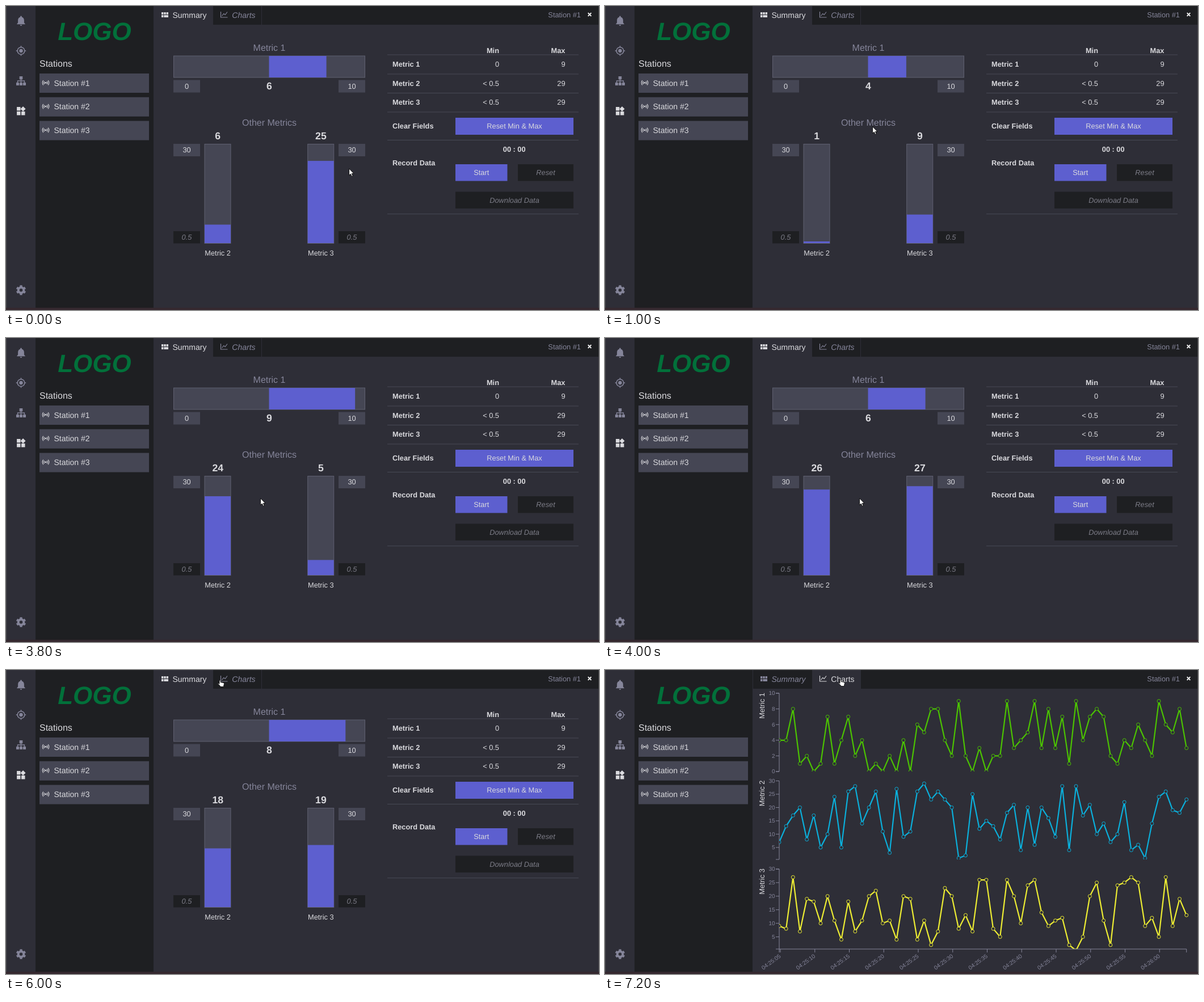
Animation of 1045 by 536 pixels, one loop 8000 ms. Source, as an HTML page:

```html
<!DOCTYPE html>
<html lang="en">
<head>
<meta charset="utf-8">
<title>Station dashboard</title>
<style>
  html, body { margin: 0; width: 100%; height: 100%; overflow: hidden; background: #2e2e37; }
  svg { display: block; width: 1045px; height: 536px; }
  text { font: 12.8px "Liberation Sans", Arial, sans-serif; fill: #dadade; text-rendering: geometricPrecision; }
  .bold { font-weight: bold; }
  .dim { fill: #85859a; }
  .off { fill: #7c7c87; font-style: italic; }
  .tick { font-size: 10px; fill: #85859a; }
</style>
</head>
<body>
<svg id="stage" viewBox="0 0 1045 536"></svg>
<script>
const BG = '#2e2e37', DARK = '#1e1f22', PANEL = '#454654', EDGE = '#5f6071',
      ACCENT = '#5d5fcf', LIGHT = '#dadade', MUTED = '#85859a', RULE = '#484955';

const series = [
  { name: 'Metric 1', color: '#4bc400', top: 41, bottom: 179, min: 0, max: 10, step: 2, data: [
    4, 4, 8, 1, 2, 0, 1, 7, 1, 4, 7, 2, 4, 0, 1, 0, 2, 0, 4, 0,
    6, 5, 8, 8, 4, 2, 9, 2, 0, 3, 0, 2, 2, 9, 3, 4, 5, 9, 3, 8,
    3, 7, 1, 9, 4, 7, 8, 7, 2, 1, 4, 3, 6, 4, 2, 9, 6, 5, 8, 3] },
  { name: 'Metric 2', color: '#0ab0dc', top: 195.5, bottom: 334, min: .5, max: 30, step: 5, data: [
    7, 13, 17, 20, 8, 17, 5, 10, 24, 5, 26, 28, 14, 20, 26, 11, 3, 27, 9, 11,
    26, 29, 23, 26, 23, 20, 1, 2, 25, 12, 15, 13, 8, 18, 21, 4, 20, 6, 20, 16,
    9, 28, 4, 28, 17, 21, 10, 14, 7, 10, 22, 4, 6, 1, 14, 24, 26, 19, 18, 23] },
  { name: 'Metric 3', color: '#eded33', top: 351, bottom: 492, min: .5, max: 30, step: 5, data: [
    9, 8, 27, 7, 19, 18, 10, 20, 11, 4, 18, 7, 11, 20, 22, 10, 11, 4, 20, 19,
    4, 11, 2, 7, 23, 20, 8, 13, 7, 26, 26, 8, 5, 26, 20, 10, 24, 26, 14, 9,
    11, 12, 2, 0, 5, 20, 25, 11, 2, 24, 25, 27, 25, 9, 12, 5, 27, 9, 19, 13] }
];

const rect = (x, y, w, h, fill, extra = '') =>
  `<rect x="${x}" y="${y}" width="${w}" height="${h}" fill="${fill}" ${extra}/>`;
const text = (x, y, s, cls = '', anchor = 'start', extra = '') =>
  `<text x="${x}" y="${y}" class="${cls}" text-anchor="${anchor}" ${extra}>${s}</text>`;
const path = (d, stroke, width = 1, extra = '') =>
  `<path d="${d}" fill="none" stroke="${stroke}" stroke-width="${width}" ${extra}/>`;
const size = px => `style="font-size:${px}px"`;
const button = (x, y, w, h, s, on) =>
  rect(x, y, w, h, on || DARK) + text(x + w / 2, y + h / 2 + 4.4, s, on ? '' : 'off', 'middle');
const gauge = (x, y, w, h) =>
  rect(x + .5, y + .5, w - 1, h - 1, PANEL, `stroke="${EDGE}"`);

function sideBar() {
  const station = (n) => {
    const y = 119 + 41.8 * n, cy = y + 16.3;
    const waves = [-1, 1].map(s =>
      path(`M${70 + s * 2.3} ${cy - 2.5}q${s * 2} 2.5 0 5M${70 + s * 4.2} ${cy - 4.2}q${s * 3.2} 4.2 0 8.4`, LIGHT, 1.1)).join('');
    return rect(59, y, 193, 34, PANEL) + waves + `<circle cx="70" cy="${cy}" r="1.4" fill="${LIGHT}"/>` +
      text(84.5, y + 21.5, `Station #${n + 1}`, '', 'start', size(14));
  };
  const node = (x, y) => rect(x, y, 5, 5, MUTED);
  return rect(52, 0, 208, 532, DARK) +
    text(156, 60, 'LOGO', '', 'middle', 'style="font-size:44px;font-weight:bold;font-style:italic;fill:#02703a"') +
    text(59, 107, 'Stations', '', 'start', size(16)) +
    [0, 1, 2].map(station).join('') +
    `<path transform="translate(15.7 15.2) scale(.9)" fill="${MUTED}" d="M12 22q2 0 2-2h-4q0 2 2 2zM18 16v-5c0-3-1.6-5.600-4.500-6.300V4a1.500 1.500 0 0 0-3 0v.7C7.600 5.400 6 8 6 11v5l-2 2v1h16v-1z"/>` +
    `<circle cx="26.500" cy="79" r="3.200" fill="${MUTED}"/><circle cx="26.500" cy="79" r="6.300" fill="none" stroke="${MUTED}" stroke-width="1.600"/>` +
    path('M26.500 70.300v2.500M26.500 85.200v2.500M17.800 79h2.500M32.700 79h2.500', MUTED, 1.6) +
    rect(23.7, 124, 5.6, 5.5, MUTED) + node(18, 135) + node(24, 135) + node(30, 135) +
    path('M26.500 129v6M20.500 135v-3h12v3', MUTED, 1.4) +
    `<path transform="translate(16.700 175.600) scale(.8)" fill="${LIGHT}" d="M13 13h8v8h-8zM3 13h8v8H3zM3 3h8v8H3zM16.700 1.700L11 7.300l5.700 5.700 5.600-5.700z"/>` +
    `<circle cx="26.500" cy="501" r="4.800" fill="none" stroke="${MUTED}" stroke-width="4"/>` +
    `<circle cx="26.500" cy="501" r="7.300" fill="none" stroke="${MUTED}" stroke-width="2.800" pathLength="12" stroke-dasharray="1.100 .9" stroke-dashoffset=".55" transform="rotate(30 26.500 501)"/>`;
}

function tabs(chartsOpen) {
  const colors = chartsOpen ? [MUTED, LIGHT] : [LIGHT, MUTED];
  const label = (x, s, i) => text(x, 21, s, '', 'start',
    `style="font-size:14px;fill:${colors[i]};font-style:${colors[i] === MUTED ? 'italic' : 'normal'}"`);
  const tile = (x, y, w) => rect(x, y, w, 4, colors[0]);
  return rect(260, 0, 784, 33, DARK) +
    rect(chartsOpen ? 365 : 260, 0, chartsOpen ? 86 : 105, 33.500, BG) +
    rect(260, 0, 1, 33, BG) + rect(450, 0, 1, 33, BG) +
    tile(274, 11, 3.4) + tile(278.3, 11, 3.4) + tile(282.6, 11, 3.4) + tile(274, 16, 3.4) + tile(278.3, 16, 7.7) +
    path('M378.500 10v10h12', colors[1], 1.2) + path('M380.500 17.500l3.200-4 2.500 2 3.800-5', colors[1], 1.2) +
    label(293.5, 'Summary', 0) + label(398.3, 'Charts', 1) +
    text(1013, 19.5, 'Station #1', 'dim', 'end') +
    path('M1025.700 12.200l5.600 5.600M1031.300 12.200l-5.600 5.600', '#fff', 1.9);
}

function summary() {
  const rows = [['Metric 1', '0', 9], ['Metric 2', '&lt; 0.5', 29], ['Metric 3', '&lt; 0.5', 29]];
  const value = (x, y) => text(x, y, '', 'bold value', 'middle', size(17.6));
  return text(464, 78.5, 'Metric 1', 'dim', 'middle', size(16)) +
    gauge(295, 87.5, 338, 39) + rect(463.5, 88, 0, 38, ACCENT, 'class="fill"') +
    button(295, 130.5, 47, 22, '0', PANEL) + button(586, 130.5, 47, 22, '10', PANEL) + value(464, 146.5) +
    text(464, 210.5, 'Other Metrics', 'dim', 'middle', size(16)) +
    [[349.5, 295, 2], [531.2, 586, 3]].map(([x, side, n]) =>
      gauge(x, 243, 47, 176) + rect(x + .5, 418, 46, 0, ACCENT, 'class="fill"') +
      button(side, 243, 47, 22, '30', PANEL) + button(side, 397, 47, 21.5, '0.5') +
      value(x + 23.7, 234.8) + text(x + 23.6, 440, 'Metric ' + n, '', 'middle')).join('') +
    text(869, 82.5, 'Min', 'bold', 'end') + text(985.5, 82.5, 'Max', 'bold', 'end') +
    rows.map(([name, lo, hi], i) => {
      const y = 107 + 33.7 * i;
      return text(681, y, name, 'bold') + text(869, y, lo, '', 'end') + text(985.5, y, hi, '', 'end');
    }).join('') +
    path([86, 120, 153.5, 187, 236.5, 366.7].map(y => `M672 ${y}H1009`).join(''), RULE) +
    text(681, 215.5, 'Clear Fields', 'bold') + text(681, 281.3, 'Record Data', 'bold') +
    text(895.7, 257, '00 : 00', 'bold', 'middle') +
    button(792, 197, 208, 30, 'Reset Min &amp; Max', ACCENT) +
    button(792, 279, 91.5, 29.5, 'Start', ACCENT) + button(902, 279, 98, 29.5, 'Reset') +
    button(792, 327.5, 208, 29.5, 'Download Data');
}

function charts() {
  const left = 307, right = 1024.7, stepX = (right - left) / 59;
  const chart = ({ name, color, top, bottom, min, max, step, data }, k) => {
    const yOf = v => bottom - (v - min) / (max - min) * (bottom - top);
    const points = data.map((v, i) => [left + i * stepX, yOf(v)]);
    let ticks = '', marks = `M301 ${top}H${left}V${bottom}H301`;
    for (let v = Math.ceil(min / step) * step; v <= max; v += step) {
      marks += `M301 ${yOf(v)}H${left}`;
      ticks += text(299.5, yOf(v) + 3.3, v, 'tick', 'end');
    }
    return path(marks, MUTED) + ticks +
      text(0, 0, name, '', 'middle', `transform="translate(280.500 ${top + 22}) rotate(-90)"`) +
      `<clipPath id="clip${k}">${rect(left, top - 4, 724, bottom - top + 4, '#000')}</clipPath><g clip-path="url(#clip${k})">` +
      path('M' + points.join('L'), color, 2.2, 'stroke-linejoin="round"') +
      points.map(([x, y]) => `<circle cx="${x}" cy="${y}" r="3" fill="${BG}" stroke="${color}"/>`).join('') + '</g>';
  };
  let times = '', marks = `M${left} 498V492H${right}V498`;
  for (let i = 0; i < 12; i++) {
    const x = 309 + 60.75 * i, s = 5 + 5 * i;
    const stamp = `04:${25 + Math.floor(s / 60)}:${String(s % 60).padStart(2, '0')}`;
    marks += `M${x} 492v6`;
    times += text(0, 0, stamp, 'tick', 'end', `transform="translate(${x + 1.5} 506) rotate(-36)"`);
  }
  return series.map(chart).join('') + path(marks, MUTED) + times;
}

const stage = document.getElementById('stage');
stage.innerHTML = rect(0, 0, 1045, 536, BG) + sideBar() +
  `<g id="summary">${tabs(false)}${summary()}</g><g id="charts">${tabs(true)}${charts()}</g>` +
  rect(0, 0, 1.3, 536, '#434247') + rect(1044, 0, 1, 536, '#434247') + rect(0, 532, 1045, 4, '#35282f') +
  `<g id="pointer"><path id="arrow" fill="#fff" stroke="#000" stroke-width=".9" d="M.6.8V12.500L3.300 10.100 5.200 14.400 7.200 13.500 5.300 9.400H9z"/>
   <path id="hand" fill="#fff" stroke="#000" stroke-width=".8" d="M3 7.500V1.700Q4-.1 5.200 1.700V4.600L10 5.400Q11.700 5.800 11.500 7.500L10.600 10.500V12.500H4.600V11.300L.6 7.400Q.9 5.700 3 7.500z"/></g>`;

const find = id => document.getElementById(id);
const fills = stage.querySelectorAll('.fill'), values = stage.querySelectorAll('.value');
const updates = [0, 1000, 2000, 3800, 4000, 5100, 6000, 7000];
const stops = [
  [1000, 471, 212], [2500, 468, 212], [3800, 448, 282], [5100, 377, 138], [5400, 340, 48],
  [5600, 336, 31], [5800, 343, 23], [6000, 373, 17], [6400, 411, 16]
];

function pointerAt(t) {
  if (t >= 1000) return stops.filter(s => s[0] <= t).pop().slice(1);
  const k = t < 300 ? 0 : (Math.floor((t - 300) / 100) + 1) / 8;
  return [604 - 133 * k, 286 - 74 * k];
}

function draw(now) {
  const t = now % 8000, onCharts = t >= 7200;
  find('summary').style.display = onCharts ? 'none' : '';
  find('charts').style.display = onCharts ? '' : 'none';

  const index = 52 + updates.filter(u => u <= t).length - 1;
  series.forEach(({ data }, i) => {
    const v = data[index];
    values[i].textContent = v;
    if (i === 0) fills[i].setAttribute('width', 16.85 * v);
    else {
      const h = 174.5 * (v - .5) / 29.5;
      fills[i].setAttribute('y', 418 - h);
      fills[i].setAttribute('height', h);
    }
  });

  find('pointer').setAttribute('transform', `translate(${pointerAt(t)})`);
  find('arrow').style.display = t < 5800 ? '' : 'none';
  find('hand').style.display = t < 5800 ? 'none' : '';
}

const start = performance.now();
function loop() {
  draw(performance.now() - start);
  requestAnimationFrame(loop);
}
loop();
</script>
</body>
</html>
```
